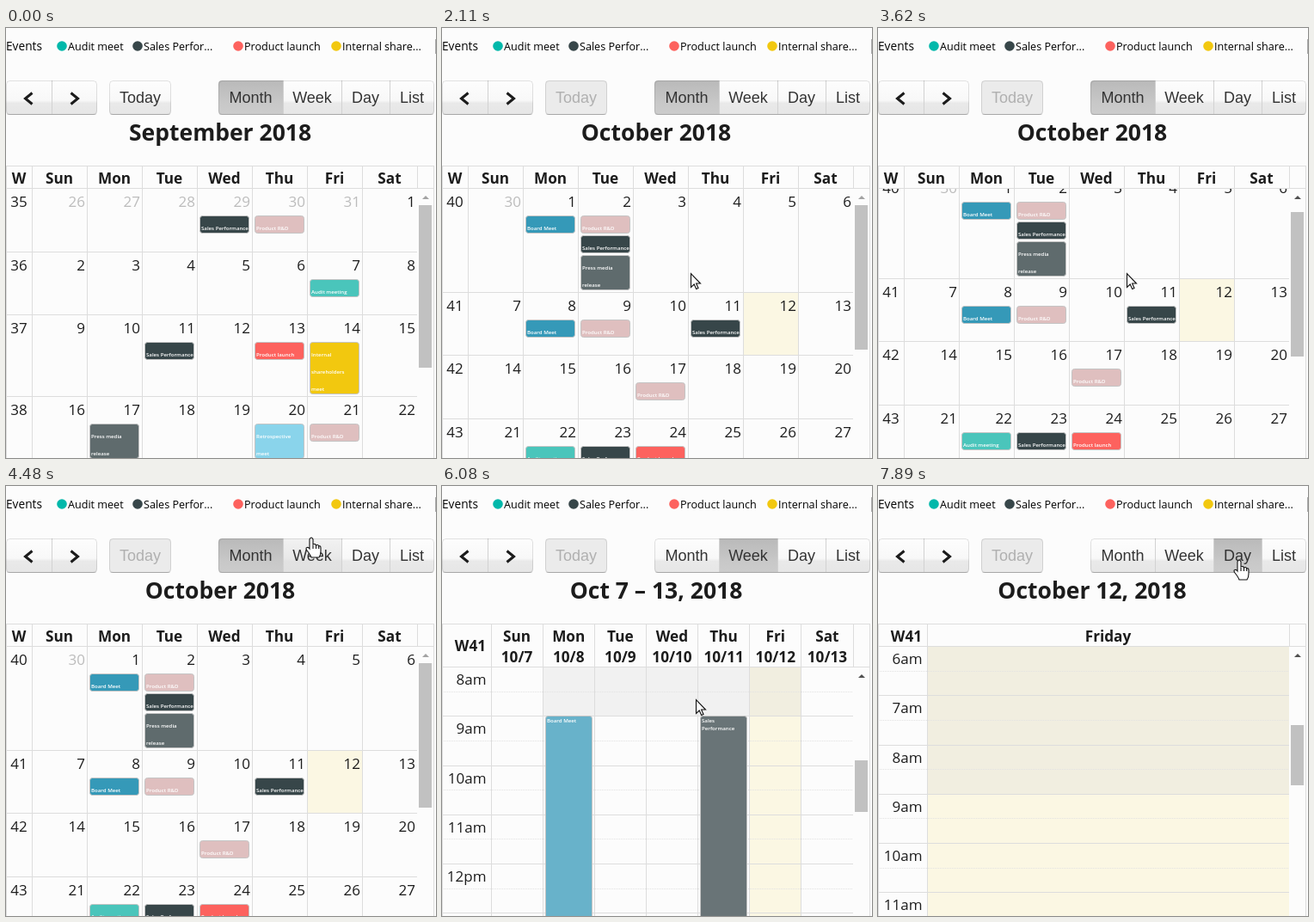
Animation, 500 px wide and 500 px high, one loop 8 s. Source, as an HTML page with a canvas:

```html
<!DOCTYPE html>
<html lang="en">
<head>
<meta charset="utf-8">
<title>Event calendar</title>
<style>
html, body { margin: 0; width: 100%; height: 100%; overflow: hidden; background: #fcfcfc; }
canvas { display: block; }
</style>
</head>
<body>
<canvas id="stage" width="500" height="500"></canvas>
<script>
const ctx = document.getElementById('stage').getContext('2d');
const LOOP = 8000, HOUR = 57.25, RIGHT = 478;
const SANS = '"Open Sans", "Noto Sans", sans-serif';
const ARIAL = '"Liberation Sans", Arial, sans-serif';
const PAGE = '#fcfcfc', LINE = '#dddddd', INK = '#1c1c1c', TODAY = '#fbf7e3';
const DAYS = ['Sun', 'Mon', 'Tue', 'Wed', 'Thu', 'Fri', 'Sat'];

// key: [colour, text lines]
const EVENTS = {
  meet: ['#01b8aa', 'Audit meet'],
  audit: ['#4ac5bb', 'Audit meeting'],
  sales: ['#374649', 'Sales Performance'],
  launch: ['#fd625e', 'Product launch'],
  share: ['#f2c80f', 'Internal', 'shareholders', 'meet'],
  press: ['#5f6b6d', 'Press media', 'release'],
  retro: ['#8ad4eb', 'Retrospective', 'meet'],
  rnd: ['#dfbfbf', 'Product R&D'],
  board: ['#3599b8', 'Board Meet']
};

// rows: [top, events by weekday]
const SEPTEMBER = {
  title: 'September 2018', week: 35, lead: 6, prev: 31, length: 30, thumb: 189,
  rows: [
    [187, { 3: 'sales', 4: 'rnd' }],
    [261, { 5: 'audit' }],
    [334, { 2: 'sales', 4: 'launch', 5: 'share' }],
    [429, { 1: 'press', 4: 'retro', 5: 'rnd' }]
  ]
};
const OCTOBER = {
  title: 'October 2018', week: 40, lead: 1, prev: 30, length: 31, thumb: 168, today: 12,
  rows: [
    [187, { 1: 'board', 2: 'rnd sales press' }],
    [308, { 1: 'board', 2: 'rnd', 4: 'sales' }],
    [381, { 3: 'rnd' }],
    [455, { 1: 'audit', 2: 'sales', 3: 'launch' }],
    [528, { 1: 'share', 2: 'rnd', 4: 'meet sales', 5: 'launch share press' }],
    [688, { 3: 'retro', 4: 'rnd', 5: 'sales' }]
  ]
};

// Motion keys: [time, value...]
const MONTH_SCROLL = [[2360, 0], [2740, 245], [3420, 245], [3620, 16], [3740, 16], [3810, 0]];
const WEEK_SCROLL = [[5870, 6 * HOUR], [6080, 8 * HOUR]];
const POINTER = [
  [470, 13, 135], [800, 70, 56], [1150, 160, 77], [1740, 160, 77], [1930, 262, 232],
  [2020, 287, 313], [2110, 289, 285], [3760, 289, 285], [4180, 350, 56], [4230, 350, 56],
  [4340, 356, 51], [4480, 355, 60], [4550, 355, 60], [4660, 357, 74], [5100, 357, 74],
  [5370, 295, 248], [7090, 295, 248], [7560, 420, 86]
];
const TODAY_CLICK = 1370, WEEK_CLICK = 4800, DAY_CLICK = 7720;

const ARROW = new Path2D('M.5 .5V16.500L4.200 13L6.700 18.500L9 17.500L6.600 12H11.500Z');
const HAND = new Path2D('M-2 2Q0-2 2 2V8Q4.500 6.500 5.500 9Q8 7.500 8.700 10Q11 9 11 12V16Q11 20 9 23H0Q-1 20-5 15Q-7 12-5 11.500Q-3.500 11-2 13Z');

function valueAt(keys, t) {
  const next = keys.findIndex(k => k[0] > t);
  if (next < 0) return keys[keys.length - 1].slice(1);
  if (next === 0) return keys[0].slice(1);
  const a = keys[next - 1], b = keys[next];
  const u = (t - a[0]) / (b[0] - a[0]), ease = u * u * (3 - 2 * u);
  return a.slice(1).map((v, i) => v + (b[i + 1] - v) * ease);
}

function rect(x, y, w, h, color) {
  ctx.fillStyle = color;
  ctx.fillRect(x, y, w, h);
}
const hline = (y, x = 0, w = RIGHT) => rect(x, y, w, 1, LINE);
const vline = (x, y, h) => rect(x, y, 1, h, LINE);

function text(str, x, y, font, color = INK, align = 'left') {
  ctx.font = font;
  ctx.fillStyle = color;
  ctx.textAlign = align;
  ctx.fillText(str, x, y);
}
const bold = (str, x, y, align = 'center') => text(str, x, y, `bold 17.2px ${SANS}`, INK, align);
const tiny = (str, x, y) => text(str, x, y, `600 6.1px ${SANS}`, '#ffffff');

function card(x, y, w, h, fill) {
  ctx.beginPath();
  ctx.roundRect(x + .5, y + .5, w - 1, h - 1, 3);
  ctx.fillStyle = fill;
  ctx.fill();
  ctx.strokeStyle = '#c4c4c4';
  ctx.lineWidth = 1;
  ctx.stroke();
}

function legend() {
  text('Events', 0, 26, `13.7px ${SANS}`, '#000000');
  [['meet', 65, 'Audit meet'], ['sales', 153, 'Sales Perfor...'],
   ['launch', 270, 'Product launch'], ['share', 384, 'Internal share...']].forEach(([key, x, label]) => {
    ctx.beginPath();
    ctx.arc(x, 21, 5.8, 0, 7);
    ctx.fillStyle = EVENTS[key][0];
    ctx.fill();
    text(label, x + 7, 26, `12.6px ${SANS}`, '#000000');
  });
  rect(499, 13, 1, 17, '#aaaaaa');
}

function shade(...colors) {
  const g = ctx.createLinearGradient(0, 61, 0, 101);
  [0, .58, .66, 1].forEach((stop, i) => g.addColorStop(stop, colors[i]));
  return g;
}

// Joined buttons between the given edges; states are '', hover, active or disabled.
function buttonGroup(edges, labels, states) {
  const x = edges[0], w = edges[edges.length - 1] - x;
  ctx.save();
  ctx.beginPath();
  ctx.roundRect(x, 61, w, 40, 4);
  ctx.clip();
  labels.forEach((label, i) => {
    const left = edges[i], width = edges[i + 1] - left, state = states[i];
    rect(left, 61, width, 40,
      state === 'active' ? shade('#b9b9b9', '#c6c6c6', '#c8c8c8', '#cccccc') :
      state === 'disabled' ? '#ebebeb' :
      state === 'hover' ? shade('#f2f2f2', '#e8e8e8', '#e2e2e2', '#e0e0e0') :
      shade('#fdfdfd', '#f8f8f8', '#e9e9e9', '#e6e6e6'));
    if (i) rect(left, 61, 1, 40, '#d2d2d2');
    text(label, left + width / 2, 87, `18px ${ARIAL}`, state === 'disabled' ? '#b0b0b0' : '#333333', 'center');
  });
  rect(x, 100, w, 1, '#bbbbbb');
  ctx.restore();
  ctx.beginPath();
  ctx.roundRect(x + .5, 61.5, w - 1, 39, 4);
  ctx.strokeStyle = 'rgba(0,0,0,.11)';
  ctx.lineWidth = 1;
  ctx.stroke();
}

function chevron(x, dir) {
  ctx.beginPath();
  ctx.moveTo(x - 4 * dir, 75.5);
  ctx.lineTo(x + 4 * dir, 82);
  ctx.lineTo(x - 4 * dir, 88.5);
  ctx.strokeStyle = INK;
  ctx.lineWidth = 3;
  ctx.stroke();
}

function toolbar(t, view, hot) {
  buttonGroup([0, 53, 106], ['', ''], ['', '']);
  chevron(26.5, -1);
  chevron(79.5, 1);
  const over = (a, b) => hot && hot[0] >= a && hot[0] < b ? 'hover' : '';
  buttonGroup([120, 192], ['Today'],
    [t >= TODAY_CLICK ? 'disabled' : t >= 1310 ? 'active' : over(120, 192)]);
  const edges = [247, 322, 390, 446, 498];
  buttonGroup(edges, ['Month', 'Week', 'Day', 'List'],
    edges.slice(0, 4).map((x, i) => i === view ? 'active' : over(x, edges[i + 1])));
}

function frameLines(title, bodyTop) {
  text(title, 249, 131, `bold 26.5px ${SANS}`, INK, 'center');
  hline(160, 0, 498);
  hline(bodyTop - 1, 0, 498);
  vline(0, 160, 340);
  vline(497, 160, 340);
  vline(RIGHT, 160, bodyTop - 160);
}

function scrollbar(top, thumbY, thumbH, moved) {
  ctx.beginPath();
  ctx.moveTo(484, top + 12);
  ctx.lineTo(488, top + 8);
  ctx.lineTo(492, top + 12);
  ctx.fillStyle = moved ? '#505050' : '#a3a3a3';
  ctx.fill();
  rect(480, Math.round(thumbY), 15, thumbH, '#c1c1c1');
}

function clipped(top, draw) {
  ctx.save();
  ctx.beginPath();
  ctx.rect(0, top, 497, 500 - top);
  ctx.clip();
  draw();
  ctx.restore();
}

function eventCard(key, x, y) {
  const [color, ...lines] = EVENTS[key], h = 20 * lines.length + 1;
  card(x, y, 58, h, color);
  lines.forEach((line, i) => tiny(line, x + 2, y + 17 + 20 * i));
  return h + 2;
}

function drawMonth(month, scroll) {
  const colX = day => 30 + 64 * day;
  clipped(187, () => {
    month.rows.forEach(([top], r) => {
      const y = Math.round(top - scroll);
      const bottom = Math.round((month.rows[r + 1] || [800])[0] - scroll);
      text(month.week + r, 15, y + 21, `17px ${SANS}`, INK, 'center');
      DAYS.forEach((_, d) => {
        const n = r * 7 + d + 1 - month.lead;
        const outside = n < 1 || n > month.length;
        const label = n < 1 ? n + month.prev : n > month.length ? n - month.length : n;
        if (n === month.today) rect(colX(d), y, 64, bottom - y, TODAY);
        text(label, colX(d) + 62, y + 21, `17px ${SANS}`, outside ? '#bcbcbc' : INK, 'right');
      });
      if (r) hline(y - 1);
    });
    DAYS.forEach((_, d) => vline(colX(d), 187, 313));
    for (const [top, events] of month.rows)
      for (const d in events) {
        let y = Math.round(top - scroll) + 31;
        for (const key of events[d].split(' ')) y += eventCard(key, colX(+d) + 3, y);
      }
  });
  frameLines(month.title, 187);
  bold('W', 15, 181);
  DAYS.forEach((name, d) => {
    vline(colX(d), 160, 27);
    bold(name, colX(d) + 32, 181);
  });
  scrollbar(187, 206 + scroll * .51, month.thumb, scroll > 1);
}

// Time grid shared by the week and day views; hours before nine are shaded in the columns from..to.
function drawAgenda(title, columns, top, scroll, todayCol, [from, to], cards) {
  const width = (RIGHT - 57) / columns, colX = i => Math.floor(57 + width * i);
  const hourY = h => Math.round(top + h * HOUR - scroll) - 1;
  clipped(top, () => {
    rect(colX(todayCol), top, width, 500 - top, TODAY);
    rect(colX(from), top, colX(to) - colX(from), Math.max(0, hourY(9) - top), 'rgba(215,215,215,.3)');
    for (let h = 6; h < 14; h++) {
      hline(hourY(h));
      for (let x = 0; x < RIGHT; x += 2) rect(x, hourY(h + .5), 1, 1, '#e2e2e2');
      const label = (h > 12 ? h - 12 : h) + (h < 12 ? 'am' : 'pm');
      text(label, 51.5, hourY(h) + 21, `17px ${SANS}`, INK, 'right');
    }
    for (let i = 0; i < columns; i++) vline(colX(i), top, 500 - top);
    for (const [col, color, ...lines] of cards) {
      const x = colX(col) + 3, y = hourY(9);
      card(x, y, 55, 600, color);
      lines.forEach((line, i) => tiny(line, x + 2, y + 8 + 8.5 * i));
    }
  });
  frameLines(title, top);
  for (let i = 0; i < columns; i++) vline(colX(i), 160, top - 160);
  return i => 57 + width * (i + .5);
}

function drawWeek(scroll) {
  const mid = drawAgenda('Oct 7 – 13, 2018', 7, 211, scroll, 5, [1, 6],
    [[1, '#68b2ca', 'Board Meet'], [4, '#697477', 'Sales', 'Performance']]);
  bold('W41', 51, 192, 'right');
  DAYS.forEach((name, d) => {
    bold(name, mid(d), 181);
    bold('10/' + (7 + d), mid(d), 205);
  });
  scrollbar(211, 231 + scroll * .192, 60, true);
}

function drawDay() {
  const mid = drawAgenda('October 12, 2018', 1, 187, 6 * HOUR, 0, [0, 1], []);
  bold('W41', 51, 181, 'right');
  bold('Friday', mid(0), 181);
  scrollbar(187, 278, 70, true);
}

function drawPointer([x, y], hand) {
  ctx.save();
  ctx.translate(x, y);
  const shape = hand ? HAND : ARROW;
  ctx.fillStyle = '#ffffff';
  ctx.fill(shape);
  ctx.strokeStyle = '#111111';
  ctx.lineWidth = 1.1;
  ctx.stroke(shape);
  if (hand) {
    ctx.beginPath();
    for (const lx of [2, 5.5, 8.7]) {
      ctx.moveTo(lx, 9);
      ctx.lineTo(lx, 13);
    }
    ctx.stroke();
  }
  ctx.restore();
}

function draw(t) {
  rect(0, 0, 500, 500, PAGE);
  const pos = valueAt(POINTER, t).map(Math.round);
  const [px, py] = pos;
  const onButton = py >= 60 && py <= 101 && (px < 106 || px >= 120 && px < 192 || px >= 247);
  const shown = t >= 470;
  const view = t < WEEK_CLICK ? 0 : t < DAY_CLICK ? 1 : 2;
  legend();
  toolbar(t, view, shown && onButton ? pos : null);
  if (t < TODAY_CLICK) drawMonth(SEPTEMBER, 0);
  else if (view === 0) drawMonth(OCTOBER, valueAt(MONTH_SCROLL, t)[0]);
  else if (view === 1) drawWeek(valueAt(WEEK_SCROLL, t)[0]);
  else drawDay();
  if (shown) drawPointer(pos, onButton);
}

const start = performance.now();
function tick() {
  draw((performance.now() - start) % LOOP);
  requestAnimationFrame(tick);
}
tick();
</script>
</body>
</html>
```
